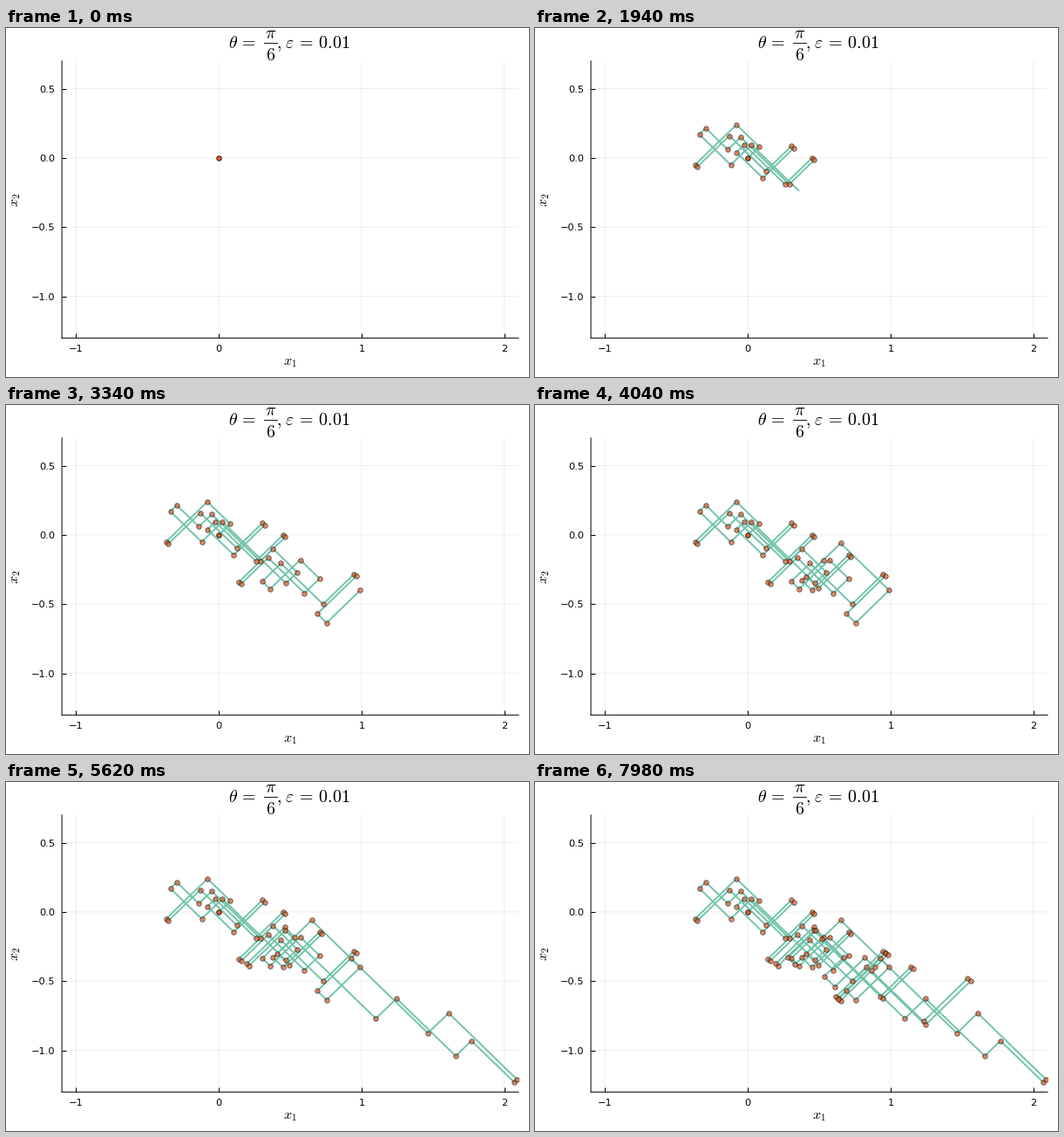
Animation of 600x400 px, one loop 8 s. Source, as a matplotlib script:

```python
import numpy as np
import matplotlib.pyplot as plt
from matplotlib.animation import FuncAnimation
from matplotlib.lines import Line2D

W, H, DPI = 600, 400, 100
PX = 72 / DPI  # points per pixel

plt.rcParams["font.family"] = "DejaVu Sans"
plt.rcParams["mathtext.fontset"] = "cm"
plt.rcParams["path.snap"] = False

# Zig-zag walk in u = x1 + x2 and v = x1 - x2: u and v move in turn.
# SWING crosses the valley u = SLOPE * v to its far wall and hops along it.
SLOPE, REACH, HOP, STEP = 0.27, 0.33, 0.03, 0.2
SWING = None
ROUTE = [
    (0.16, -0.32), SWING, (0.03, 0.22), SWING, (-0.04, -0.12), (0.07, 0.45), SWING,
    (0.10, -0.20), (-0.08, -0.51), (-0.17, -0.07), (0.12, 0.82), (0.28, 0.48), SWING,
    (0.18, 1.02), (0.39, 0.75), (-0.03, 0.64), (0.23, 1.23), SWING, (0.12, 1.39),
    (0.59, 0.71), (0.05, 0.85), SWING, (0.11, 0.71), (0.35, 0.57), SWING,
    (0.33, 1.87), (0.62, 2.70), (0.84, 3.30), (0.88, 2.34), (0.59, 1.26), SWING,
    (0.44, 2.02), (1.06, 2.06), (0.43, 1.23), SWING, SWING, (0.49, 1.15),
    (0.07, 1.00), (0.34, 0.61), (-0.05, 0.71), (0.32, 1.54), SWING, (0.32, 1.62),
]


def walk():
    """Return the corners of the walk as rows of (u, v)."""
    u = v = 0.0
    rows = [(u, v)]
    for stop in ROUTE:
        if stop is SWING:
            mid = SLOPE * v
            stop = (mid - REACH if u > mid else mid + REACH, v + HOP)
        rows.append((stop[0], v))
        u, v = stop
        rows.append((u, v))
    return np.array(rows)


def build_states(uv):
    """Return (corners passed, head position) for every step."""
    states = [(1, uv[0])]
    for i in range(1, len(uv)):
        a, b = uv[i - 1], uv[i]
        count = max(1, round(np.abs(b - a).sum() / STEP))
        for k in range(1, count + 1):
            states.append((i + (k == count), a + (b - a) * k / count))
    return states


def to_xy(uv):
    return np.column_stack([uv[:, 0] + uv[:, 1], uv[:, 0] - uv[:, 1]]) / 2


def step_at(frame):
    """Three steps for every seven ticks, with a pause on the second."""
    cycle, tick = divmod(frame, 7)
    return 3 * cycle + (0 if tick < 1 else 1 if tick < 6 else 2)


corners = walk()
states = build_states(corners)

fig = plt.figure(figsize=(W / DPI, H / DPI), dpi=DPI, facecolor="white")


def label(x, y, text, size, **kw):
    fig.text(x / W, 1 - y / H, text, fontsize=size * PX, va="baseline", **kw)


left, right, top, bottom = 64.1, 588.0, 37.8, 355.3
ax = fig.add_axes([left / W, 1 - bottom / H, (right - left) / W, (bottom - top) / H])
ax.set(xlim=(-1.1, 2.1), ylim=(-1.3, 0.7))
ax.set_xticks([-1, 0, 1, 2])
ax.set_yticks([-1.0, -0.5, 0.0, 0.5])
ax.tick_params(direction="in", length=5 * PX, width=PX, labelsize=11.4 * PX)
ax.tick_params(axis="x", pad=7.3 * PX)
ax.tick_params(axis="y", pad=7.6 * PX)
ax.grid(color="black", alpha=0.08, linewidth=0.8 * PX)
ax.set_axisbelow(True)
for side in ("top", "right"):
    ax.spines[side].set_visible(False)
for side in ("left", "bottom"):
    ax.spines[side].set_linewidth(PX)

label(254.5, 23, r"$\theta\,=$", 20, ha="left")
label(304, 12, r"$\pi$", 20, ha="center")
label(304, 37, r"$6$", 20, ha="center")
label(394.5, 23, r"$,\hspace{0.1}\varepsilon\,=\,0.01$", 20, ha="right")
fig.add_artist(Line2D([296.5 / W, 311.5 / W], [1 - 17.5 / H] * 2, color="black", linewidth=0.9 * PX))
label(325.5, 386, r"$x_1$", 16, ha="center")
label(14.3, 197, r"$x_2$", 16, ha="center", rotation=90, rotation_mode="anchor")

trail, = ax.plot([], [], color="#1b9e77", alpha=0.6, linewidth=2 * PX,
                 solid_capstyle="butt", solid_joinstyle="round", zorder=3)
dot = dict(s=(5.5 * PX) ** 2, facecolor="#de5f2c", edgecolor="black", linewidth=0.8 * PX)
ax.scatter([0], [0], zorder=4, **dot)
dots = ax.scatter([], [], alpha=0.68, zorder=5, **dot)


def draw(frame):
    passed, head = states[min(step_at(frame), len(states) - 1)]
    line = to_xy(np.vstack([corners[:passed], head]))
    trail.set_data(line[:, 0], line[:, 1])
    dots.set_offsets(line[1:passed])
    return trail, dots


anim = FuncAnimation(fig, draw, frames=400, interval=20, repeat=True, repeat_delay=0,
                     init_func=lambda: draw(0), blit=False)
plt.show()
```
